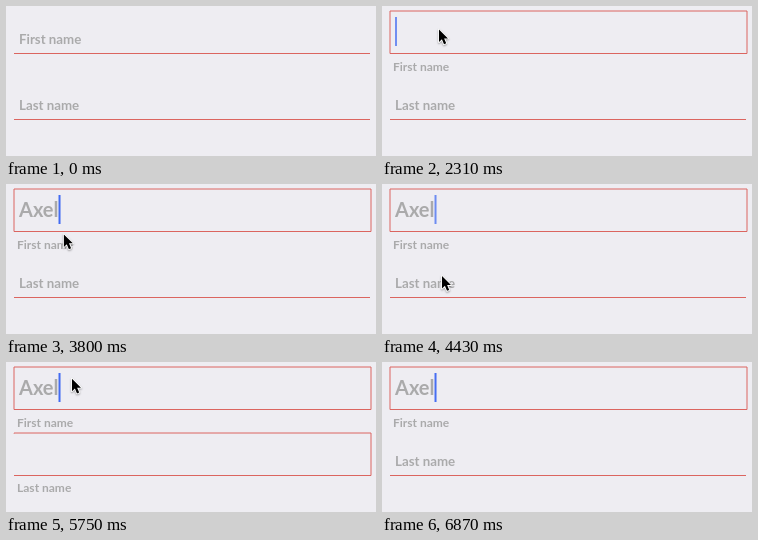
Animation, 370 px wide and 150 px high, one loop 7050 ms. Source, as an HTML page with a canvas:

```html
<!DOCTYPE html>
<html lang="en">
<head>
<meta charset="utf-8">
<title>Text field animation</title>
<style>
  html, body { margin: 0; width: 100%; height: 100%; overflow: hidden; background: #eeedf2; }
  canvas { display: block; width: 370px; height: 150px; }
</style>
</head>
<body>
<canvas id="stage"></canvas>
<script>
const LOOP = 7050;
const NAME = 'Axel';
const KEY_TIMES = [2660, 2900, 3080, 3320];
const CLICK_FIRST = 1700, CLICK_LAST = 4440, CLICK_BACK = 5726;
const LEFT = 8, RIGHT = 365, HEIGHT = 42.5;
const LINE_LENGTH = 356, FULL_LENGTH = 2 * (RIGHT - LEFT + HEIGHT);

const canvas = document.getElementById('stage');
const ctx = canvas.getContext('2d');
const ratio = window.devicePixelRatio || 1;
canvas.width = 370 * ratio;
canvas.height = 150 * ratio;

const clamp = v => Math.min(1, Math.max(0, v));
const mix = (a, b, p) => a + (b - a) * p;

function bezier(x1, y1, x2, y2) {
  const at = (a, b, s) => 3 * a * s * (1 - s) ** 2 + 3 * b * s * s * (1 - s) + s ** 3;
  return x => {
    if (x <= 0 || x >= 1) return clamp(x);
    let low = 0, high = 1;
    for (let i = 0; i < 20; i++) {
      const mid = (low + high) / 2;
      if (at(x1, x2, mid) < x) low = mid; else high = mid;
    }
    return at(y1, y2, low);
  };
}
const ease = bezier(.25, .1, .25, 1);
const easeInOut = bezier(.42, 0, .58, 1);
const easeOut = bezier(.35, .3, .6, 1);

// Pointer moves: start, end, from x, y, to x, y, easing
const MOVES = [
  [490, 950, 66, -16, 57, 23.5, easeOut],
  [3660, 4140, 57, 23.5, 59.5, 101, easeOut],
  [4290, 4440, 59.5, 101, 60, 92, easeInOut],
  [5010, 5280, 60, 92, 66, 16.7, easeInOut],
  [5850, 6440, 66, 16.7, 278, 150, easeInOut]
];

function text(string, x, y, size) {
  ctx.font = `700 ${size}px Lato, sans-serif`;
  ctx.fillStyle = '#aaaaab';
  ctx.fillText(string, x, y);
  return ctx.measureText(string).width;
}

function drawField(label, bottom, t, openAt, closeAt = Infinity) {
  const open = (duration, curve) => t < closeAt
    ? curve(clamp((t - openAt) / duration))
    : 1 - curve(clamp((t - closeAt) / duration));
  const border = open(250, ease), shift = open(300, easeInOut);
  const top = bottom - HEIGHT;

  ctx.beginPath();
  ctx.moveTo(LEFT, bottom);
  ctx.lineTo(RIGHT, bottom);
  ctx.lineTo(RIGHT, top);
  ctx.lineTo(LEFT, top);
  ctx.closePath();
  ctx.setLineDash(border < 1 ? [mix(LINE_LENGTH, FULL_LENGTH, border), FULL_LENGTH] : []);
  ctx.strokeStyle = '#db6560';
  ctx.lineWidth = 1;
  ctx.stroke();
  ctx.setLineDash([]);

  text(label, mix(13, 11, shift), bottom + mix(-9.5, 17, shift), mix(13.3, 12, shift));
}

// Solid, fade out, pause, fade in again
function drawCaret(x, y, age) {
  ctx.globalAlpha = age < 900 ? 1 - clamp((age - 570) / 150) : clamp((age - 1000) / 150);
  ctx.fillStyle = '#426bf2';
  ctx.fillRect(x, y, 2, 29);
  ctx.globalAlpha = 1;
}

function drawPointer(t) {
  const move = MOVES.filter(m => t >= m[0]).pop();
  if (!move || t > 6440) return;
  const [start, end, x0, y0, x1, y1, curve] = move;
  const p = curve(clamp((t - start) / (end - start)));
  ctx.save();
  ctx.translate(mix(x0, x1, p), mix(y0, y1, p));
  ctx.scale(.88, .88);
  const arrow = new Path2D('M0 0V14.2L3.3 11.1L5.7 16.8L8.2 15.7L5.8 10.2H10.2Z');
  ctx.lineJoin = 'round';
  ctx.lineWidth = 2;
  ctx.strokeStyle = '#fff';
  ctx.shadowColor = 'rgba(0,0,0,.35)';
  ctx.shadowBlur = 2 * ratio;
  ctx.shadowOffsetY = ratio;
  ctx.stroke(arrow);
  ctx.shadowColor = 'transparent';
  ctx.fillStyle = '#000';
  ctx.fill(arrow);
  ctx.restore();
}

function draw(t) {
  ctx.setTransform(ratio, 0, 0, ratio, 0, 0);
  ctx.fillStyle = '#eeedf2';
  ctx.fillRect(0, 0, 370, 150);

  drawField('First name', 47.5, t, CLICK_FIRST);
  drawField('Last name', 113.5, t, CLICK_LAST, CLICK_BACK);

  const typed = KEY_TIMES.filter(k => t >= k);
  const width = text(NAME.slice(0, typed.length), 13, 33, 20);

  if (t >= CLICK_BACK) drawCaret(13 + width, 11, t - CLICK_BACK);
  else if (t >= CLICK_LAST) drawCaret(13, 77, t - CLICK_LAST);
  else if (t >= CLICK_FIRST) drawCaret(13 + width, 11, t - (typed.pop() || CLICK_FIRST));

  drawPointer(t);
}

function tick() {
  draw(performance.now() % LOOP);
  requestAnimationFrame(tick);
}
tick();
</script>
</body>
</html>
```
